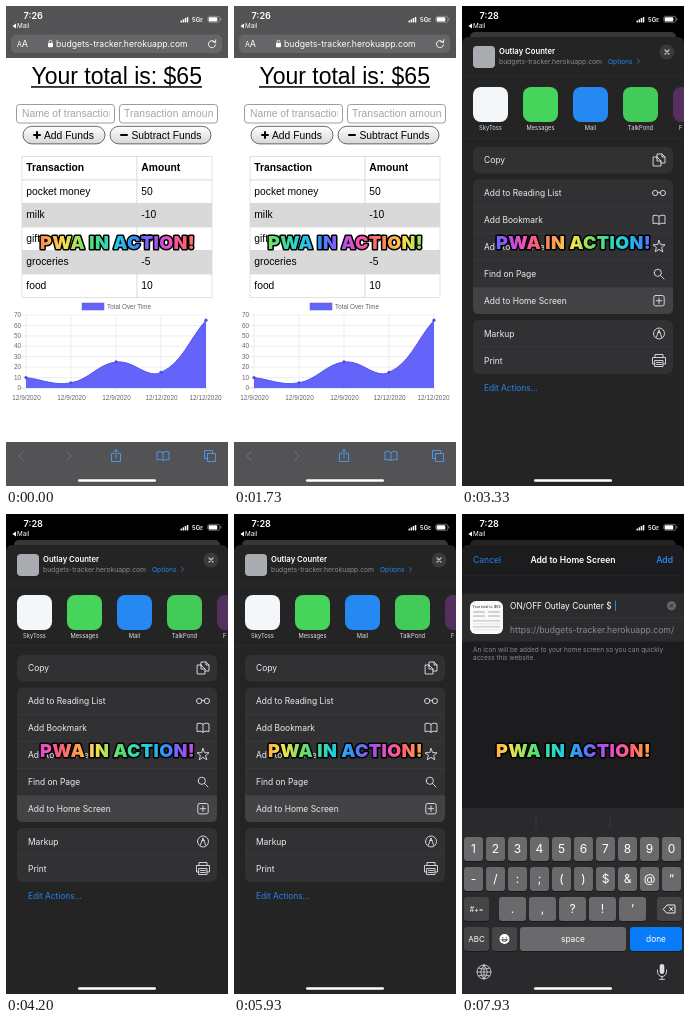
These frames come from a looping animation (222 px wide and 480 px high, 8 s). An HTML page:

```html
<!DOCTYPE html>
<html lang="en">
<head>
<meta charset="utf-8">
<title>PWA in action</title>
<style>
  html, body { margin: 0; width: 100%; height: 100%; overflow: hidden; background: #000; }
  svg { display: block; width: 100%; height: 100%; }
  text { font-family: Inter, "Open Sans", sans-serif; white-space: pre; }
  .page text { font-family: "Liberation Sans", Arial, sans-serif; }
  .icon { fill: none; stroke-linecap: round; stroke-linejoin: round; }
</style>
</head>
<body>
<svg id="stage" viewBox="0 0 222 480"></svg>
<script>
const LOOP = 8000, FPS = 15, CUTS = [3000, 6000], CYCLE_WIDTH = 155;
const BLUE = '#2584ee', GREY = '#8b8b90';
const SITE = 'budgets-tracker.herokuapp.com';

const text = (x, y, size, fill, content, extra = '') =>
  `<text x="${x}" y="${y}" font-size="${size}" fill="${fill}" ${extra}>${content}</text>`;
const rect = (x, y, w, h, fill, r = 0, extra = '') =>
  `<rect x="${x}" y="${y}" width="${w}" height="${h}" rx="${r}" fill="${fill}" ${extra}/>`;
const circle = (x, y, r, fill, extra = '') =>
  `<circle cx="${x}" cy="${y}" r="${r}" fill="${fill}" ${extra}/>`;
const icon = (x, y, d, color = '#e4e4e6', width = .9) =>
  `<path class="icon" transform="translate(${x} ${y})" d="${d}" stroke="${color}" stroke-width="${width}"/>`;
const line = (x1, y1, x2, y2, color, width = .6) =>
  `<path d="M${x1} ${y1}L${x2} ${y2}" stroke="${color}" stroke-width="${width}"/>`;
const MIDDLE = 'text-anchor="middle"', BOLD = 'font-weight="600"';

const BOOK = 'M0-3.5Q-3-5.5-6-4V4Q-3 2.5 0 4.5Q3 2.5 6 4V-4Q3-5.5 0-3.5V4.5';
const CROSS = 'M-2-2L2 2M2-2L-2 2';

function statusBar(clock) {
  const bars = [0, 1, 2, 3].map(i => rect(174.5 + i * 2.1, 14.5 - i * 1.2, 1.5, 2 + i * 1.2, '#fff', .4));
  return text(17.6, 13, 9.1, '#fff', clock, BOLD) +
    '<path d="M10 17.5V22.5L6.5 20Z" fill="#fff"/>' + text(11, 22.3, 6.3, '#fff', 'Mail') +
    bars.join('') + text(186, 16, 6, '#fff', '5G<tspan font-size="4.6">E</tspan>', BOLD) +
    rect(201.8, 10.3, 12, 6, 'none', 1.8, 'stroke="#aaa" stroke-width=".6"') +
    rect(202.7, 11.2, 8.6, 4.2, '#fff', 1) + rect(214.5, 12.2, .8, 2.2, '#aaa', .4);
}

const homeBar = rect(72, 473.2, 78, 2.6, '#fff', 1.3);

function chart() {
  const y = v => 382 - v * 73 / 70;
  const values = [10, 5, 25, 15, 65];
  const dates = ['12/9/2020', '12/9/2020', '12/9/2020', '12/12/2020', '12/12/2020'];
  const curve = 'M20 371.6C38 373.7 47 379.9 65 376.8C83 373.7 92 358.1 110 356' +
    'C128 353.9 140.6 373.1 155 366.4C176.6 356.4 182 335 200 314.2';
  let out = rect(76, 297, 22, 7, '#6464fb', 0, 'stroke="#5858e8" stroke-width=".5"') +
    text(101, 303, 6.3, '#666', 'Total Over Time');
  for (let v = 0; v <= 70; v += 10) {
    out += line(15, y(v), 200, y(v), v ? '#e3e3e3' : '#bbb') +
      text(15, y(v) + 2.2, 6.4, '#666', v, 'text-anchor="end"');
  }
  values.forEach((v, i) => {
    const x = 20 + i * 45;
    out += line(x, 309, x, 387, '#e3e3e3') +
      text(i === 4 ? 199.5 : x + .5, 394.3, 6.4, '#666', dates[i], MIDDLE);
  });
  out += `<path d="${curve}V382H20Z" fill="#6464fb"/>` +
    `<path d="${curve}" fill="none" stroke="#5656ea" stroke-width="1"/>`;
  values.forEach((v, i) => out += circle(20 + i * 45, y(v), 1.6, '#4c4cdf'));
  return out;
}

function table() {
  const rows = [['Transaction', 'Amount'], ['pocket money', 50], ['milk', -10],
    ['gift', 20], ['groceries', -5], ['food', 10]];
  const border = 'stroke="#d6d6d6" stroke-width=".7"';
  return rows.map(([name, amount], i) => {
    const y = 150.5 + i * 23.5, fill = i === 2 || i === 4 ? '#d9d9d9' : '#fff';
    const weight = i ? '' : 'font-weight="700"';
    return rect(16, y, 115, 23.5, fill, 0, border) + rect(131, y, 75, 23.5, fill, 0, border) +
      text(20.3, y + 14.5, 10.3, '#000', name, weight) + text(135.3, y + 14.5, 10.3, '#000', amount, weight);
  }).join('');
}

function pageScene() {
  const field = 'stroke="#858585" stroke-width=".8"';
  const pill = 'stroke="#444" stroke-width=".8"';
  const bar = '#535355';
  return rect(0, 0, 222, 480, '#fff') + rect(0, 0, 222, 52, bar) + statusBar('7:26') +
    rect(5, 28.5, 211, 18.5, '#666668', 5) +
    text(11, 41, 7, '#fff', 'A<tspan font-size="9">A</tspan>') +
    rect(42, 37, 5, 4.2, '#fff', .8) + icon(44.5, 37, 'M-1.4 0V-1.3A1.4 1.4 0 0 1 1.4-1.3V0', '#fff', .8) +
    text(50, 41, 8.65, '#fff', SITE) +
    icon(206, 38, 'M3.3-1.4A3.6 3.6 0 1 0 3.6 .8M.6-2.4L3.4-1.4L3.8-4.2', '#fff', .9) +
    '<g class="page">' +
    text(110.7, 78, 23, '#000', 'Your total is: $65', MIDDLE) + rect(25, 80.2, 171, 1.5, '#000') +
    rect(10.5, 98.5, 98, 18.5, '#fff', 3, field) + rect(113.5, 98.5, 98, 18.5, '#fff', 3, field) +
    '<g clip-path="url(#fields)">' +
    text(16, 111.3, 10.3, '#a4a4a4', 'Name of transaction') +
    text(118, 111.3, 10.3, '#a4a4a4', 'Transaction amount', 'letter-spacing=".1"') + '</g>' +
    rect(17, 120.3, 82, 17.6, 'url(#button)', 8.8, pill) + rect(104, 120.3, 101, 17.6, 'url(#button)', 8.8, pill) +
    icon(31, 129, 'M-3 0H3M0-3V3', '#000', 2) + text(38, 132.6, 10.3, '#000', 'Add Funds') +
    icon(118, 129, 'M-3 0H3', '#000', 2) + text(125.5, 132.6, 10.3, '#000', 'Subtract Funds') +
    table() + chart() + '</g>' +
    rect(0, 436, 222, 44, bar) +
    icon(15, 450, 'M2-4.5L-2 0L2 4.5', '#737376', 1) + icon(63, 450, 'M-2-4.5L2 0L-2 4.5', '#737376', 1) +
    icon(110, 450, 'M-2-2.5H-4.5V5.5H4.5V-2.5H2M0 2V-6.5M-2.3-4.3L0-6.5L2.3-4.3', '#4b9df5') +
    icon(157, 450, BOOK, '#4b9df5') +
    icon(204, 450, 'M-2-2.5H5.5V5.5H-2.5V-2.5M-2.5 2.5H-5.5V-5.5H2.5V-2.5', '#4b9df5') + homeBar;
}

function shareScene() {
  const card = '#313133', sheet = '#242425';
  const apps = [['SkyToss', '#f4f7fa'], ['Messages', '#46d45a'], ['Mail', '#2689f3'],
    ['TalkPond', '#42cb58'], ['', '#54305f']];
  const row = (y, label, d) => text(22, y + 3, 8.45, '#ececee', label) + icon(197, y, d);
  const rules = ys => ys.map(y => line(11, y, 211, y, '#3f3f42', .5)).join('');
  return rect(0, 0, 222, 480, '#000') + rect(8, 26, 206, 20, '#373738', 5) + rect(0, 31, 222, 455, sheet, 6) +
    statusBar('7:28') + rect(11, 40, 22, 22, '#a9adb1', 4) +
    text(37, 48, 7.7, '#fff', 'Outlay Counter', BOLD) + text(37, 57.6, 6.75, GREY, SITE) +
    text(146, 57.6, 6.7, BLUE, 'Options') + icon(176.5, 55.3, 'M-1-2L1 0L-1 2', BLUE, .8) +
    circle(205, 46, 7.5, '#3a3a3d') + icon(205, 46, CROSS, '#c6c6ca', 1.2) +
    line(0, 70, 222, 70, '#363639', .5) +
    apps.map(([name, color], i) => rect(11 + i * 50, 81, 35, 35, color, 8) +
      text(28.5 + i * 50, 123.5, 5.8, '#dedee0', name, MIDDLE)).join('') +
    text(217, 123.5, 5.8, '#dedee0', 'F') + line(0, 132, 222, 132, '#343437', .5) +
    rect(11, 141, 200, 26.5, card, 6) + rect(11, 173.5, 200, 134.5, card, 6) +
    '<path d="M11 281.5H211V302Q211 308 205 308H17Q11 308 11 302Z" fill="#434346"/>' +
    rect(11, 314, 200, 54, card, 6) + rules([200.5, 227.5, 254.5, 281.5, 341]) +
    row(154, 'Copy', 'M-2-2V-6H3L6-3V3H2M3-6V-3H6M-5.5-3H-2L2 1V6H-5.5ZM-2-3V1H2') +
    row(187, 'Add to Reading List', 'M-6.5 0A2.6 2.6 0 1 0-1.2 0A2.6 2.6 0 1 0-6.5 0M1.2 0A2.6 2.6 0 1 0 6.5 0A2.6 2.6 0 1 0 1.2 0M-1.2-.5Q0-1.4 1.2-.5') +
    row(213.7, 'Add Bookmark', BOOK) +
    row(240.5, 'Add to Favorites', 'M0-6L1.6-1.9L6-1.7L2.6 1L3.8 5.3L0 2.9L-3.8 5.3L-2.6 1L-6-1.7L-1.6-1.9Z') +
    row(267.8, 'Find on Page', 'M-4.8-1A3.6 3.6 0 1 0 2.4-1A3.6 3.6 0 1 0-4.8-1M1.4 1.6L5 5.2') +
    row(294.7, 'Add to Home Screen', 'M-3.4-5.2H3.4Q5.2-5.2 5.2-3.4V3.4Q5.2 5.2 3.4 5.2H-3.4Q-5.2 5.2-5.2 3.4V-3.4Q-5.2-5.2-3.4-5.2M-2.7 0H2.7M0-2.7V2.7') +
    row(327.5, 'Markup', 'M-5.5 0A5.5 5.5 0 1 0 5.5 0A5.5 5.5 0 1 0-5.5 0M-2.7 3.8L0-3.6L2.7 3.8M-1-1H1') +
    row(354.5, 'Print', 'M-4-3V-6H4V-3M-4 3.5H-6.5V-3H6.5V3.5H4M-4 0H4V6H-4ZM-2.5 2H2.5M-2.5 4H2.5') +
    text(22, 384.5, 8.3, BLUE, 'Edit Actions...') + homeBar;
}

function keyboard() {
  const key = (x, y, w, label, size = 12, fill = '#6a6a6c') =>
    rect(x, y + .8, w, 24, '#161617', 3) + rect(x, y, w, 24, fill, 3) +
    text(x + w / 2, y + 12 + size * .36, size, '#fff', label, MIDDLE);
  const DARK = '#454547';
  let out = rect(0, 294, 222, 186, '#2a2a2c') +
    line(74, 302, 74, 315, '#454548') + line(148, 302, 148, 315, '#454548');
  ['1234567890', '-/:;()$&@“'].forEach((keys, r) => [...keys].forEach((label, i) =>
    out += key(2 + i * 22, 323 + r * 30, 19, label.replace('&', '&amp;'))));
  [...'.,?!’'].forEach((label, i) => out += key(37 + i * 30, 383, 27, label));
  return out + key(2, 383, 25, '#+=', 7, DARK) + key(195, 383, 25, '', 8, DARK) +
    icon(207.5, 395, 'M-6 0L-2.5-4H5.5V4H-2.5ZM0-1.7L3.4 1.7M3.4-1.7L0 1.7', '#fff') +
    key(2, 413, 25, 'ABC', 8, DARK) + key(30, 413, 25, '', 8, DARK) +
    circle(42.5, 425, 5, '#fff') + icon(42.5, 425, 'M-1.7-1.5V-1M1.7-1.5V-1M-2.7 1Q0 4.2 2.7 1Z', DARK, 1) +
    key(58, 413, 106, 'space', 8.4) + key(168, 413, 52, 'done', 8.4, '#087bfb') +
    icon(22, 458, 'M-7 0A7 7 0 1 0 7 0A7 7 0 1 0-7 0H7M0-7V7M0-7Q-6.5 0 0 7Q6.5 0 0-7M-5.6-3.8Q0-1.8 5.6-3.8M-5.6 3.8Q0 1.8 5.6 3.8', '#dedee0', .8) +
    rect(197.7, 450, 4.6, 10, '#dedee0', 2.3) + icon(200, 458, 'M-4.5-2V0A4.5 4.5 0 0 0 4.5 0V-2M0 4.5V7.3M-2.5 7.3H2.5', '#dedee0');
}

function homeScreenScene() {
  const card = '#2c2c2e';
  const thumbnail = rect(8, 87, 33, 33, '#fafafa', 6) +
    text(24.5, 94, 3.5, '#222', 'Your total is: $65', MIDDLE) +
    [[11, 97], [26, 97], [11, 101], [26, 101]].map(([x, y]) => rect(x, y, 12, 2, '#d0d0d2', 1)).join('') +
    [106, 109, 112, 115].map((y, i) => rect(11, y, 27, 1.6, i % 2 ? '#ededed' : '#d2d2d4')).join('');
  return rect(0, 0, 222, 480, '#000') + rect(8, 26, 206, 20, '#232324', 5) + rect(0, 31, 222, 455, '#1c1c1e', 6) +
    statusBar('7:28') + text(11, 49, 8.6, BLUE, 'Cancel') +
    text(111, 49, 8.6, '#fff', 'Add to Home Screen', `${MIDDLE} ${BOLD}`) +
    text(211, 49, 8.6, BLUE, 'Add', `text-anchor="end" ${BOLD}`) +
    line(0, 61.5, 222, 61.5, '#2b2b2e', .5) + rect(0, 79.5, 222, 48, card) + thumbnail +
    text(48, 95, 8.4, '#fff', 'ON/OFF Outlay Counter $') + rect(153, 86.5, 1, 10.5, BLUE) +
    circle(209.5, 91.8, 4.6, '#66666a') + icon(209.5, 91.8, 'M-1.5-1.5L1.5 1.5M1.5-1.5L-1.5 1.5', card, 1) +
    line(48, 103.7, 222, 103.7, '#414144', .5) + text(48, 119, 8.65, GREY, `https://${SITE}/`) +
    text(11, 137.5, 6.5, GREY, 'An icon will be added to your home screen so you can quickly') +
    text(11, 146.3, 6.5, GREY, 'access this website.') + keyboard() + homeBar;
}

const rainbow = [[0, '#f7e24b'], [.16, '#55e070'], [.32, '#22d3d8'], [.45, '#3090fa'],
  [.57, '#9a4ff5'], [.68, '#f050c0'], [.78, '#fb6070'], [.88, '#ff9a4a'], [1, '#f7e24b']];
const scenes = [pageScene(), shareScene(), homeScreenScene()];
const stage = document.getElementById('stage');
stage.innerHTML = `<defs>
  <linearGradient id="rainbow" gradientUnits="userSpaceOnUse" x1="0" y1="0" x2="${CYCLE_WIDTH}" y2="0" spreadMethod="repeat">
    ${rainbow.map(([at, color]) => `<stop offset="${at}" stop-color="${color}"/>`).join('')}</linearGradient>
  <linearGradient id="button" x2="0" y2="1"><stop stop-color="#fff"/><stop offset="1" stop-color="#d6d6d6"/></linearGradient>
  <clipPath id="fields"><path d="M15 99H103.5V117H15ZM118 99H207V117H118Z"/></clipPath></defs>` +
  scenes.map(scene => `<g class="scene">${scene}</g>`).join('') +
  text(111.6, 243, 18, 'url(#rainbow)', 'PWA IN ACTION!',
    `${MIDDLE} font-weight="900" letter-spacing=".4" stroke="#000" stroke-width="3" stroke-linejoin="round" paint-order="stroke"`);

const sceneGroups = stage.querySelectorAll('.scene');
const gradient = document.getElementById('rainbow');

function draw() {
  const time = performance.now() % LOOP;
  const current = CUTS.filter(cut => time >= cut).length;
  sceneGroups.forEach((group, i) => group.style.display = i === current ? '' : 'none');
  // Colours drift right by one full cycle per second, in steps.
  const phase = Math.floor(time * FPS / 1000 + .06) / FPS;
  const shift = 48 + CYCLE_WIDTH * (phase % 1 - 14 / 15);
  gradient.setAttribute('gradientTransform', `translate(${shift} 0)`);
  requestAnimationFrame(draw);
}
draw();
</script>
</body>
</html>
```
